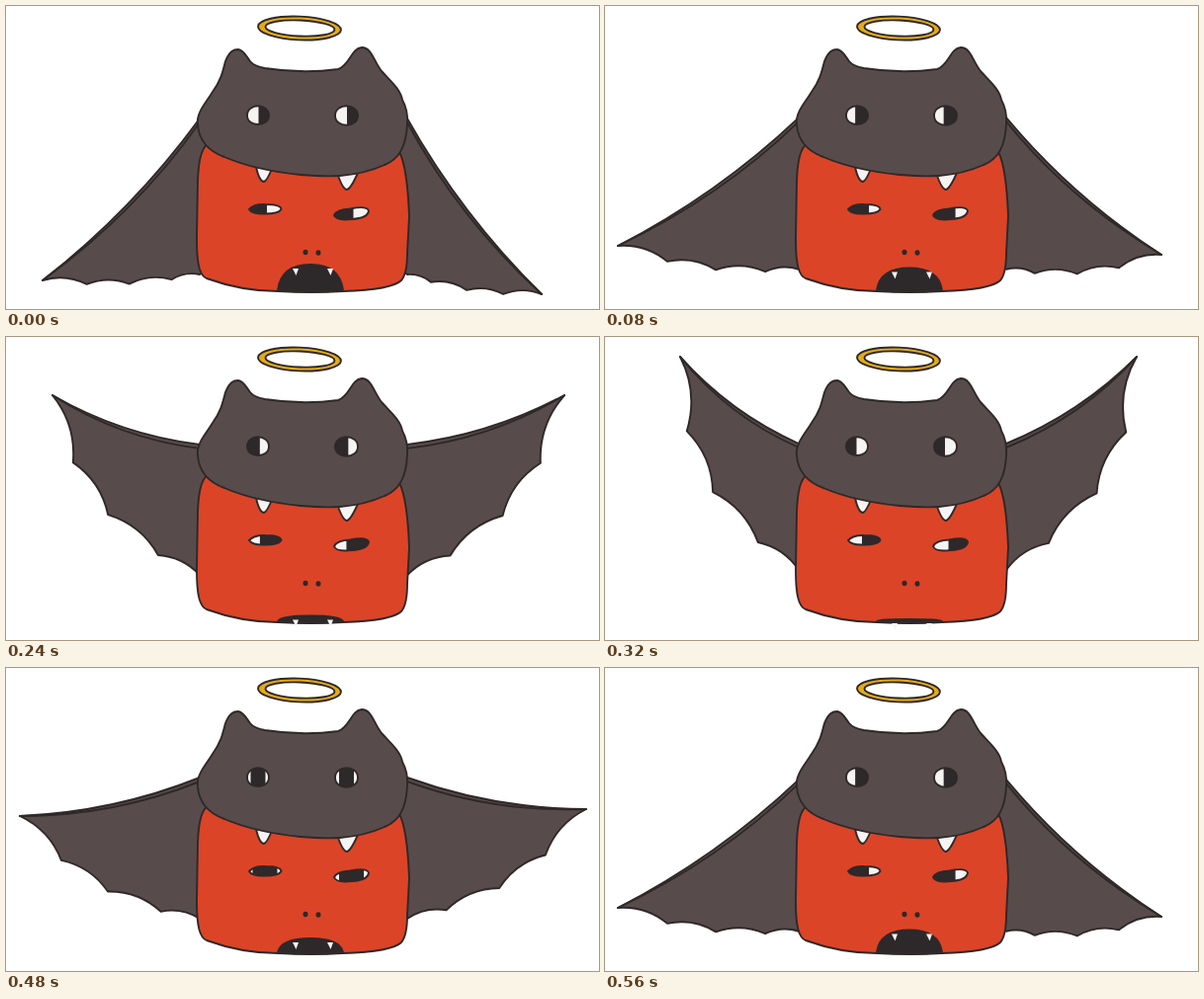
Write an HTML page that moves like this. It is 600 by 307 pixels and loops after 0.64 s.

```html
<!DOCTYPE html>
<html lang="en">
<head>
<meta charset="utf-8">
<title>Flapping bat</title>
<style>
  html, body { margin: 0; width: 100%; height: 100%; overflow: hidden; background: #fff; }
  svg { display: block; width: 100vw; height: 100vh; }
  .ink { stroke: #2f2829; stroke-width: 1.9; stroke-linejoin: round; stroke-linecap: round; }
  .bat { fill: #574c4b; }
  .red { fill: #dc4427; }
  .white { fill: #f6f4f3; }
  .pupil { fill: #2d2829; }
  .none { fill: none; }
</style>
</head>
<body>
<svg viewBox="0 0 600 307">
  <defs></defs>
  <g id="wings"></g>
  <path class="ink red" d="M203 141 Q195 147 194 178 L193 236 C193 262 196 273 203 276 C225 284 250 289 275 289 Q310 291 341 289 C372 288 393 285 400 278 Q406 271 406 250 L408 213 Q406 163 398 148Z"/>
  <path class="ink white" d="M253 163 C255 172 258 178 261 178 Q264 177 269 165Z"/>
  <path class="ink white" d="M335 169 C338 178 342 186 345 186 Q349 185 356 169Z"/>
  <path class="ink bat" d="M194 120 C192 108 204 96 209 87 C217 76 219 68 222 56 C226 46 230 44 235 44 C241 45 243 51 247 56 Q251 61 262 63 Q300 69 336 64 C348 60 349 43 360 42 C370 42 372 56 380 66 C388 75 399 84 401 95 Q407 106 406 119 C405 142 398 155 383 161 C352 175 322 173 298 171 C268 168 242 162 221 153 C202 146 195 134 194 120Z"/>
  <ellipse class="pupil" cx="303" cy="249.5" rx="2.5" ry="2.7"/>
  <ellipse class="pupil" cx="316" cy="250" rx="2.5" ry="2.7"/>
  <g transform="rotate(2.5 297 22)">
    <ellipse class="ink" cx="297" cy="22.5" rx="42" ry="11.9" fill="#e4ab16"/>
    <ellipse class="ink" cx="297.5" cy="22.5" rx="35" ry="8" fill="#fff"/>
  </g>
  <g id="faces"></g>
</svg>
<script>
const STEP = 80;
const STEPS = 8;
const POSES = 5;

// Key points of each wing tip on its way from the lowest to the highest pose.
const WINGS = [
  { side: -1, x: 196, tips: [[37, 278], [13, 243], [14, 150], [47, 59], [76, 20]] },
  { side: 1, x: 406, tips: [[542, 292], [563, 252], [587, 143], [565, 59], [538, 20]] }
];
const SCALLOPS = [.28, .55, .82, 1];

const BAT_GAZE = { swing: 8, half: 7.5 };
const RED_GAZE = { swing: -10.5, half: 12.5 };
const EYES = [
  { x: 255, gaze: BAT_GAZE, d: "M244 111 C244 98 266 98 266 111 C266 123 244 123 244 111Z" },
  { x: 344.5, gaze: BAT_GAZE, d: "M333 111 C333 98 356 98 356 111 C356 124 333 124 333 111Z" },
  { x: 262, gaze: RED_GAZE, d: "M246 206 Q251 200.5 262 201 Q278 201 278.5 206 Q276 210.5 262 210.5 Q249 211 246 206Z" },
  { x: 349.5, gaze: RED_GAZE, d: "M332 212 Q335 206 348 205.5 Q365 202 367 207.5 Q366 215 350 216 Q334 218 332 212Z" }
];

const path = (cls, d, extra = "") => `<path class="${cls}" d="${d}" ${extra}/>`;
const distance = (a, b) => Math.hypot(b[0] - a[0], b[1] - a[1]);

// The point at fraction t from a to b, moved sideways off that line.
function beside(a, b, t, offset) {
  const [dx, dy] = [b[0] - a[0], b[1] - a[1]];
  const k = offset / Math.hypot(dx, dy);
  return [a[0] + dx * t - dy * k, a[1] + dy * t + dx * k];
}

// drop runs from 1 (wings down) to -1 (wings up).
function wing({ side, x, tips }, pose, drop) {
  const tip = tips[pose];
  const shoulder = [x, 111 + 3 * drop];
  const armpit = [x, 254 + 18 * drop];
  const bulge = 22.5 - 15.5 * drop;
  const rim = inset => `M${x} ${shoulder[1] + inset}Q${beside(shoulder, tip, .5, side * (16 + inset))} ${tip}`;
  let from = tip;
  let d = rim(0);
  for (const t of SCALLOPS) {
    const to = beside(tip, armpit, t, -side * bulge * 4 * t * (1 - t));
    d += `Q${beside(from, to, .5, side * .2 * distance(from, to))} ${to}`;
    from = to;
  }
  return path("ink bat", d + "L301 200Z") + path("ink none", rim(4));
}

function mouth(drop) {
  const top = 274 - 12 * drop;
  const side = top + (288 - top) * .4;
  const fang = x => path("white", `M${x - 3} ${top + 4}h6l-2.5 7Z`);
  return path("ink pupil", `M275 288C277 ${side} 287 ${top} 308 ${top}S339 ${side} 341 288Q308 291 275 288Z`)
    + fang(293) + fang(328);
}

function eye({ x, gaze, d }, index, drop) {
  const start = x + gaze.swing * drop - gaze.half;
  return path("white", d)
    + `<rect class="pupil" clip-path="url(#eye${index})" x="${start}" y="90" width="${gaze.half * 2}" height="140"/>`
    + path("ink none", d);
}

// Shows a layer only during the steps that use its pose; the cycle goes up and back down.
function addLayer(parent, pose, markup) {
  const layer = document.createElementNS("http://www.w3.org/2000/svg", "g");
  layer.innerHTML = markup;
  document.getElementById(parent).append(layer);
  const frames = Array.from({ length: STEPS + 1 }, (_, step) => ({
    offset: step / STEPS,
    opacity: Math.min(step, STEPS - step) === pose ? 1 : 0,
    easing: "steps(1, end)"
  }));
  layer.animate(frames, { duration: STEP * STEPS, iterations: Infinity }).startTime = 0;
}

document.querySelector("defs").innerHTML =
  EYES.map((e, i) => `<clipPath id="eye${i}">${path("", e.d)}</clipPath>`).join("");

for (let pose = 0; pose < POSES; pose++) {
  const drop = Math.cos(pose / (POSES - 1) * Math.PI);
  addLayer("wings", pose, WINGS.map(w => wing(w, pose, drop)).join(""));
  addLayer("faces", pose, EYES.map((e, i) => eye(e, i, drop)).join("") + mouth(drop));
}
</script>
</body>
</html>
```
